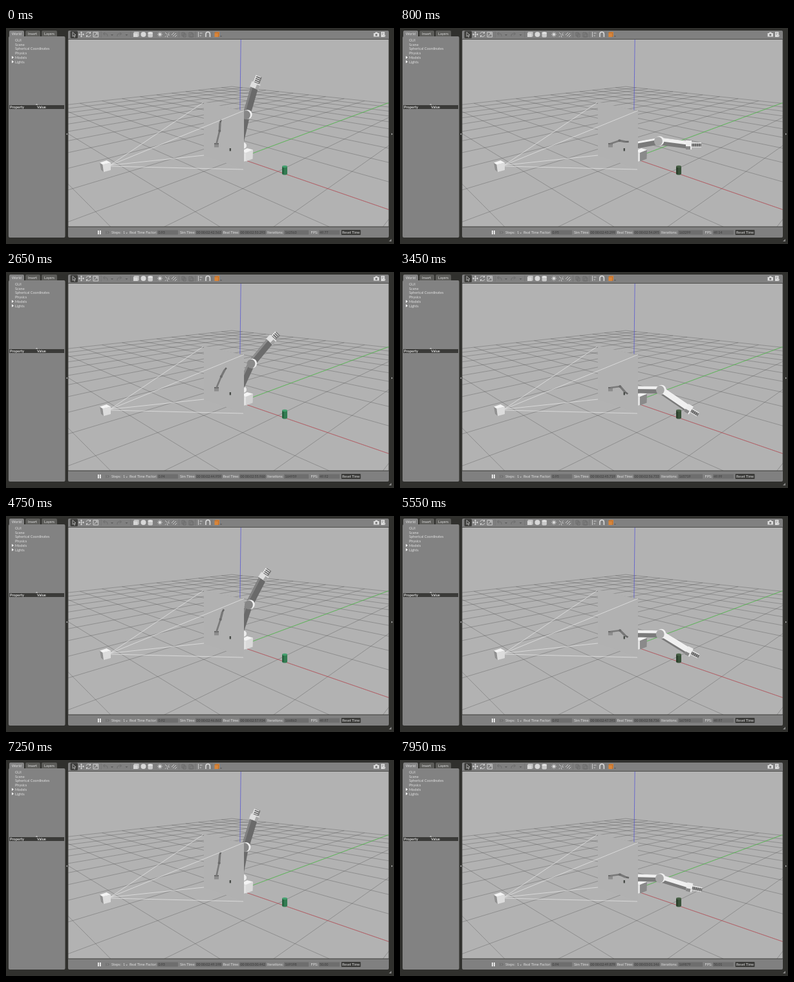
Recreate the animation shown at these times as an HTML page with a canvas. Size 600 by 336 pixels, loop 8 s.

```html
<!DOCTYPE html>
<html lang="en">
<head>
<meta charset="utf-8">
<title>Robot arm simulation</title>
<style>
html, body { margin: 0; width: 100%; height: 100%; overflow: hidden; background: #30302d; }
canvas, svg { position: absolute; left: 0; top: 0; width: 600px; height: 336px; display: block; }
text { font: 5.6px Lato, "Open Sans", sans-serif; fill: #dedede; }
.bold { font-weight: bold; }
.field text { font-size: 5.2px; fill: #3c3c3c; }
.field rect { fill: #6e6e6e; }
.line { fill: none; stroke: #eee; stroke-width: .8; }
.dim { fill: none; stroke: #686868; stroke-width: 1; }
.icons { opacity: .85; }
</style>
</head>
<body>
<canvas id="view"></canvas>
<svg viewBox="0 0 600 336">
  <!-- side panel -->
  <rect x="4" y="13" width="87.500" height="313" rx="2" fill="#828282"/>
  <path d="M5 14V6q0-2 2-2h19q2 0 2 2v8z" fill="#828282"/>
  <path d="M30 13V6q0-2 2-2h19q2 0 2 2v7zM55 13V6q0-2 2-2h20q2 0 2 2v7z" fill="#5c5c59"/>
  <g text-anchor="middle">
    <text x="16.300" y="10.500">World</text><text x="41" y="10.500">Insert</text><text x="67" y="10.500">Layers</text>
  </g>
  <text x="14" y="21">GUI</text>
  <text x="14" y="27.700">Scene</text>
  <text x="14" y="34.400">Spherical Coordinates</text>
  <text x="14" y="41.100">Physics</text>
  <text x="14" y="47.800">Models</text>
  <text x="14" y="54.500">Lights</text>
  <path d="M9 43.500l3 2.300-3 2.300zM9 50.200l3 2.300-3 2.300z" fill="#fff"/>
  <path d="M45.500 119.500l2-1.500 2 1.500z" fill="#ddd"/>
  <rect x="5" y="120" width="85" height="6" fill="#3a3a38"/>
  <text class="bold" x="6" y="125">Property</text><text class="bold" x="48" y="125">Value</text>
  <path d="M95 163.500v3l-2-1.500zM596 163.500v3l2-1.500z" fill="#bbb"/>
  <path d="M592 332l4-4v4z" fill="#888"/>

  <!-- toolbar -->
  <path d="M96 17.500V6q0-2 2-2h492q2 0 2 2v11.500z" fill="#808080"/>
  <rect x="99.500" y="4.500" width="11.500" height="11.500" rx="1.500" fill="#3d3d3b"/>
  <g class="icons">
    <path d="M103 6.500l5 4.500-2.400.2 1.300 2.500-1.200.6-1.200-2.600-1.500 1.500z" fill="none" stroke="#eee" stroke-width=".7"/>
    <path class="line" d="M116.500 6.500v7M113 10h7"/>
    <path d="M116.500 5.500l1.700 2h-3.400zM116.500 14.500l1.700-2h-3.400zM112 10l2-1.700v3.400zM121 10l-2-1.700v3.400z" fill="#eee"/>
    <path class="line" d="M124 9a3.500 3.500 0 0 1 6-1.500M131 11a3.500 3.500 0 0 1-6 1.500"/>
    <path d="M131 5.500v3h-3zM124 14.500v-3h3z" fill="#eee"/>
    <path class="line" d="M135 6.500h7.500v7.500h-7.500zM136.500 12.500l4.500-4.500M138.500 8h2.500v2.500"/>
    <path d="M147 5v10M193 5v10M267.500 5v10M293 5v10M318.500 5v10" stroke="#6d6d6d" stroke-width=".7"/>
    <path class="dim" d="M151 9h4q2.500 0 2 4M153 6.500L150.500 9l2.500 2.500M178 9h-4q-2.500 0-2 4M176 6.500l2.500 2.500-2.500 2.500M272 7h4v5h-4zM274 9h4v5h-4zM283 7h5v7h-5zM285 9h5v5h-5z"/>
    <path d="M162 10h4l-2 2zM184.500 10h4l-2 2zM331 12h3l-1.500 2z" fill="#555"/>
    <path d="M197 7.500l1.500-1.500h7v6.500l-1.500 1.500h-7z" fill="#e4e4e4"/>
    <path d="M197 7.500h7v6.500M204 7.500l1.500-1.500" fill="none" stroke="#aaa" stroke-width=".6"/>
    <circle cx="212.500" cy="10" r="4" fill="#e8e8e8"/>
    <path d="M219.500 7.500v5.500a3.700 1.500 0 0 0 7.400 0v-5.500z" fill="#d8d8d8"/>
    <ellipse cx="223.200" cy="7.500" rx="3.700" ry="1.500" fill="#f6f6f6"/>
    <circle cx="238" cy="10" r="1.700" fill="#fff"/>
    <path class="line" d="M238 6v8M234 10h8M235.200 7.200l5.600 5.600M240.800 7.200l-5.600 5.600"/>
    <path class="line" d="M246 7l3 3M250 10.500l3 .5M249 11.500l1 3M247 12.500l-1 1.500M250.500 9l2-1.500"/>
    <path class="line" d="M256 11l4-4M258 13l5-5M261 14l3-3"/>
    <path class="line" d="M297.500 6v8M299.500 8h4M299.500 12h2.500"/>
    <path d="M309 14V9.500a3.200 3.200 0 0 1 6.400 0V14" fill="none" stroke="#eee" stroke-width="1.500"/>
    <path d="M322.500 7.500l1.500-1.500h6v6.500l-1.500 1.500h-6z" fill="#e8862e"/>
    <path d="M322.500 7.500h6v6.500" fill="none" stroke="#a65a18" stroke-width=".6"/>
    <path d="M568.500 8h2l1-1.500h2.500l1 1.500h2v5.500h-8.500z" fill="#eee"/>
    <circle cx="572.700" cy="10.700" r="1.700" fill="#777"/>
    <path d="M580 6h5.500v8H580z" fill="#eee"/><path d="M581 8h3M581 10h2" stroke="#777" stroke-width=".7"/>
    <circle cx="585" cy="12" r="1.800" fill="#ddd"/>
  </g>

  <!-- status bar -->
  <path d="M96 309.500h496V324q0 2-2 2H98q-2 0-2-2z" fill="#808080"/>
  <path d="M96 17.500h496V309H96z" fill="none" stroke="#4a4a48" stroke-width=".8"/>
  <path d="M142 315h1.600v6H142zM145 315h1.600v6H145z" fill="#fff"/>
  <path class="dim" d="M155 315.500v5M157 316l2.500 2-2.500 2"/>
  <text x="163" y="319.800">Steps:</text><text x="181" y="319.800">1</text>
  <path d="M185.500 318.500l1.200 1.500 1.200-1.500z" fill="#ddd"/>
  <text x="191" y="319.800">Real Time Factor:</text>
  <text x="269" y="319.800">Sim Time:</text>
  <text x="335.500" y="319.800">Real Time:</text>
  <text x="404" y="319.800">Iterations:</text>
  <text x="471.500" y="319.800">FPS:</text>
  <g class="field">
    <rect x="234" y="314.500" width="32" height="7"/><text id="factor" x="235.500" y="319.800"/>
    <rect x="293" y="314.500" width="41" height="7"/><text id="sim" x="294.500" y="319.800"/>
    <rect x="361" y="314.500" width="41" height="7"/><text id="real" x="362.500" y="319.800"/>
    <rect x="430" y="314.500" width="38" height="7"/><text id="steps" x="431.500" y="319.800"/>
    <rect x="484" y="314.500" width="32" height="7"/><text id="fps" x="485" y="319.800"/>
  </g>
  <rect x="518.500" y="314" width="30" height="8" rx="1" fill="#3a3a38"/>
  <text x="533.500" y="320" text-anchor="middle">Reset Time</text>
</svg>
<script>
const LOOP = 8000;
const canvas = document.getElementById('view');
const ratio = window.devicePixelRatio || 1;
canvas.width = 600 * ratio;
canvas.height = 336 * ratio;
const ctx = canvas.getContext('2d');
ctx.scale(ratio, ratio);

const mix = (a, b, k) => a + (b - a) * k;
const clamp = v => Math.max(0, Math.min(1, v));
const grey = v => `rgb(${v},${v},${v})`;

// elbow, wrist and fingertip on screen
const POSES = {
  up: [362, 133, 366, 84, 367, 70],
  tilt: [372, 135, 385, 90, 391, 75],
  lean: [376, 138, 398, 95, 406, 83],
  mid: [384, 148, 425, 119, 438, 111],
  flat: [400, 176, 446, 182, 466, 182],
  dip: [402, 184, 447, 198, 467, 202],
  low: [403, 183.5, 446, 213, 461, 222]
};
const MOVES = [
  [0, 'tilt'], [80, 'lean'], [280, 'mid'], [700, 'flat'], [820, 'flat'], [1080, 'low'],
  [1300, 'flat'], [1480, 'mid'], [1650, 'lean'], [1750, 'tilt'], [1850, 'up'],
  [2380, 'up'], [2530, 'lean'], [2800, 'mid'], [3100, 'dip'], [3450, 'low'],
  [3600, 'low'], [3950, 'mid'], [4100, 'lean'], [4230, 'up'],
  [4570, 'up'], [4750, 'lean'], [4980, 'mid'], [5300, 'dip'], [5600, 'low'],
  [5950, 'dip'], [6350, 'mid'], [6500, 'lean'], [6650, 'up'],
  [7150, 'up'], [7330, 'lean'], [7550, 'mid'], [7900, 'dip'], [8000, 'dip']
].map(([t, name]) => [t, ...POSES[name]]);

// time, iterations, real time in ms, real time factor, frame rate
const STATUS = [
  [0, 162563, 173293, .93, 49.77], [800, 163299, 174095, .95, 49.14],
  [1650, 164008, 174993, .92, 49.84], [3450, 165719, 176733, .95, 49.99],
  [4750, 166863, 177934, .92, 49.97], [6350, 168322, 179537, .92, 49.98],
  [7950, 169879, 181146, .94, 50.01]
];

function sample(rows, t) {
  const i = rows.findIndex(r => r[0] > t);
  if (i < 0) return rows[rows.length - 1].slice(1);
  const [a, b] = [rows[i - 1], rows[i]];
  const k = (t - a[0]) / (b[0] - a[0]);
  return a.slice(1).map((v, j) => mix(v, b[j + 1], k));
}

function poly(color, ...p) {
  ctx.fillStyle = color;
  ctx.beginPath();
  for (let i = 0; i < p.length; i += 2) ctx.lineTo(p[i], p[i + 1]);
  ctx.fill();
}

function line(color, width, ...p) {
  ctx.strokeStyle = color;
  ctx.lineWidth = width;
  ctx.beginPath();
  for (let i = 0; i < p.length; i += 2) ctx.lineTo(p[i], p[i + 1]);
  ctx.stroke();
}

function oval(color, x, y, rx, ry = rx) {
  ctx.fillStyle = color;
  ctx.beginPath();
  ctx.ellipse(x, y, rx, ry, 0, 0, 7);
  ctx.fill();
}

function box(color, x, y, w, h) {
  ctx.fillStyle = color;
  ctx.fillRect(x, y, w, h);
}

// ground plane seen from a camera pitched 0.276 rad, turned 45 degrees
const depth = (x, y) => 5.98 + .962 * (y - x) * Math.SQRT1_2;
function ground(x, y) {
  const z = depth(x, y);
  return [344 + 429.5 * ((x + y) * Math.SQRT1_2 + .237) / z, 42 + 960 / z];
}

function groundLine(color, width, x1, y1, x2, y2) {
  const near = .4, a = depth(x1, y1), b = depth(x2, y2);
  if (a < near && b < near) return;
  const cut = (near - a) / (b - a);
  const at = k => ground(mix(x1, x2, k), mix(y1, y2, k));
  line(color, width, ...at(a < near ? cut : 0), ...at(b < near ? cut : 1));
}

function drawWorld() {
  box('#b2b2b2', 96, 18, 496, 291);
  for (let i = -10; i <= 10; i++) {
    groundLine('#4d4d4d', .36, i, -10, i, 10);
    groundLine('#4d4d4d', .36, -10, i, 10, i);
  }
  groundLine('#d83c48', .55, 0, 0, 10, 0);
  groundLine('#44d83c', .6, 0, 0, 0, 10.3);
  line('#4444d8', .65, 361, 202.5, 363.2, 18);
}

// a bar whose lit upper face widens as it tips forward and down
function link(x1, y1, x2, y2, w, low) {
  const len = Math.hypot(x2 - x1, y2 - y1);
  const nx = (y2 - y1) / len * w, ny = -(x2 - x1) / len * w;
  const lit = Math.max(.25, Math.min(.8, .4 + .65 * Math.atan2(y2 - y1, x2 - x1)));
  const band = (color, a, b) => poly(color,
    x1 + nx * a, y1 + ny * a, x2 + nx * a, y2 + ny * a,
    x2 + nx * b, y2 + ny * b, x1 + nx * b, y1 + ny * b);
  band(grey(mix(106, 122, low)), 1, -1);
  band(grey(mix(130, 240, low)), 1, 1 - 2 * lit);
}

function drawHand(wx, wy, tx, ty, low) {
  const reach = Math.hypot(tx - wx, ty - wy);
  const half = mix(5, 4, low);
  ctx.save();
  ctx.translate(wx, wy);
  ctx.rotate(Math.atan2(ty - wy, tx - wx));
  box('#5e5e5e', 4, -half, reach - 4, half * 2);
  for (let x = 6; x < reach; x += 3) box(grey(mix(226, 150, low)), x, -half, 1.4, half * 2);
  box('#e8e8e8', 4, -half, reach - 4, 1.6);
  box(grey(mix(120, 215, low)), 4, half - 1.6, reach - 4, 1.6);
  box(grey(mix(222, 236, low)), -4, -7, 9, 14);
  box(grey(mix(165, 135, low)), -4, 2, 7, 5);
  ctx.restore();
}

function drawRobot([ex, ey, wx, wy, tx, ty], low) {
  poly('#e2e2e2', 358, 195, 371, 194, 371, 207, 358, 210);
  poly(grey(mix(218, 138, low)), 371, 193.5, 382, 189.5, 381.5, 203.5, 371, 207.5);
  poly('#f4f4f4', 360, 193, 373, 187, 382, 189.5, 371, 194);
  oval('#ececec', 367, 183, 5);
  link(361, 183, ex, ey, 5.4, low);
  link(ex, ey, wx, wy, 5.8, low);
  oval('#f0f0f0', ex + 1.4, ey - .4, 7.2, 7.4);
  oval(grey(mix(134, 168, low)), ex - .6, ey + .3, 6.4, 7);
  drawHand(wx, wy, tx, ty, low);
}

function drawCan(x, y, shade) {
  const tone = (a, b) => `rgb(${a.map((v, i) => Math.round(mix(v, b[i], shade)))})`;
  const side = tone([52, 124, 82], [58, 82, 58]);
  oval(side, x, y + 5.8, 4, 1.8);
  box(side, x - 4, y - 5.6, 8, 11.4);
  box(tone([36, 98, 62], [42, 62, 42]), x - 4, y - 5.6, 2.6, 11.6);
  oval(tone([70, 160, 112], [74, 98, 72]), x, y - 5.5, 4, 1.7);
}

// picture shown on the virtual camera's image plane
function drawPlane([ex, ey, wx, wy, tx, ty], canX, canY) {
  poly('#b1b1b1', 306, 115, 368, 129, 368, 220, 306, 198);
  const far = (x, y) => [333 + (x - 392) * .28, 143 + (y - 76) * .32];
  const elbow = [330 + (ex - 371) * .32, 160 + (ey - 135) * .37];
  box('#8c8c8c', 322, 179.5, 7, 6);
  box('#6a6a6a', 322, 179, 7, 2);
  line('#7a7a7a', 2.6, 325.5, 180, ...elbow);
  line('#777', 3.4, ...elbow, ...far(wx, wy));
  line('#666', 2.6, ...far(wx, wy), ...far(tx, ty));
  oval('#6c6c6c', ...elbow, 2);
  box('#484c48', 345.6 + (canX - 431) * .3, 187 + (canY - 221) * .27, 2.4, 4.4);
}

function drawCamera() {
  for (const p of [[305, 116], [368, 128.5], [306, 198], [367, 220]])
    line('#eee', .65, 161, p[1] > 210 ? 215 : 213.5, ...p);
  poly('#909090', 145, 209.5, 149.5, 212.5, 151, 224, 147, 220.5);
  poly('#dcdcdc', 149.5, 212.5, 162, 209.5, 162, 221, 151, 224);
  poly('#f4f4f4', 145, 209.5, 155.5, 206, 162, 209.5, 149.5, 212.5);
}

const clock = ms => {
  const pad = (v, n) => String(v).padStart(n, '0');
  return `00 00:${pad(Math.floor(ms / 60000), 2)}:${pad(Math.floor(ms / 1000) % 60, 2)}.${pad(ms % 1000, 3)}`;
};
const write = (id, value) => { document.getElementById(id).textContent = value; };

function drawStatus(t) {
  const [steps, real, factor, fps] = sample(STATUS, t);
  write('factor', factor.toFixed(2));
  write('sim', clock(Math.round(steps)));
  write('real', clock(Math.round(real)));
  write('steps', Math.round(steps));
  write('fps', fps.toFixed(2));
}

function draw(t) {
  const pose = sample(MOVES, t);
  const low = clamp((pose[5] - 85) / 95);
  const pushed = t < 1850 ? clamp((t - 950) / 500) : 0;
  const canX = 431 - 25 * pushed, canY = 221 - 9 * pushed;
  ctx.save();
  ctx.beginPath();
  ctx.rect(96, 18, 496, 291);
  ctx.clip();
  drawWorld();
  drawCan(canX, canY, clamp((pose[5] - 130) / 45));
  drawRobot(pose, low);
  drawPlane(pose, canX, canY);
  drawCamera();
  ctx.restore();
  drawStatus(t);
}

function hold(t) {
  const rest = t % 200;
  return t - rest + (rest < 50 ? 0 : rest < 150 ? 50 : 150);
}

const start = performance.now();
let shown = -1;
function tick() {
  const t = hold((performance.now() - start) % LOOP);
  if (t !== shown) draw(shown = t);
  requestAnimationFrame(tick);
}
tick();
</script>
</body>
</html>
```
